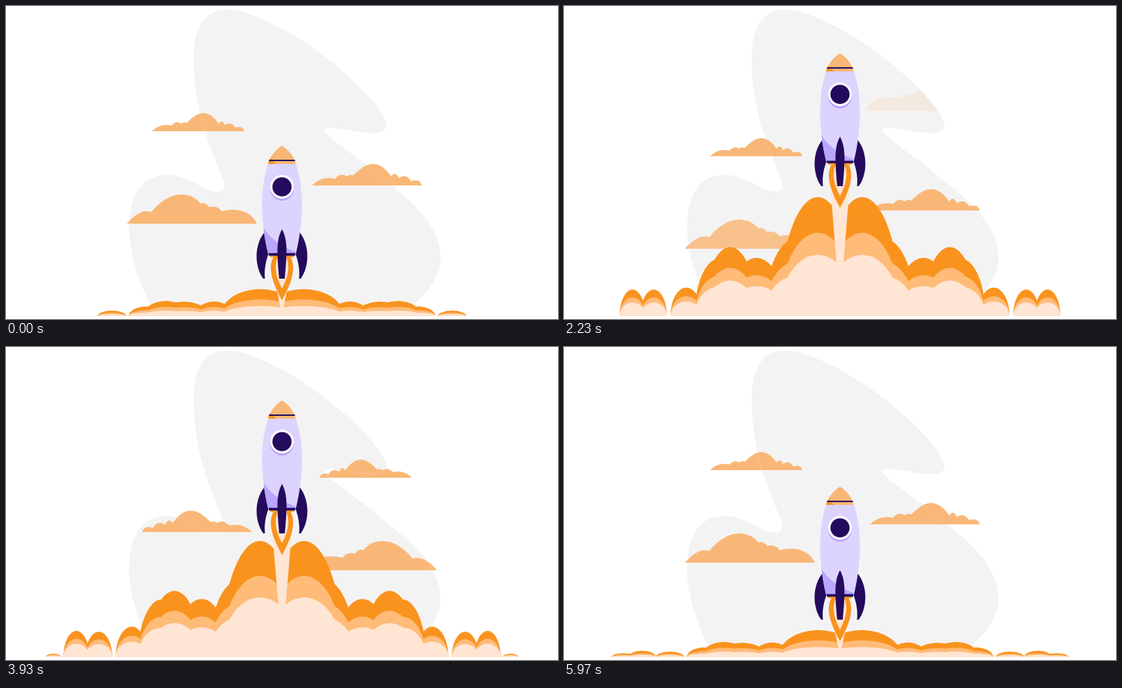
Write an HTML page that moves like this. It is 794 px wide and 450 px high and loops after 6010 ms.

```html
<!DOCTYPE html>
<html lang="en">
<head>
<meta charset="utf-8">
<title>Rocket launch</title>
<style>
html, body { margin: 0; width: 100%; height: 100%; overflow: hidden; background: #fff; }
svg { display: block; width: 794px; height: 450px; }
.navy { fill: #250b5d; }
.orange { fill: #f9931e; }
.mid { fill: #ffbb78; }
.light { fill: #ffe5d3; }
.cloud { fill: #f9b777; }
</style>
</head>
<body>
<svg viewBox="0 0 794 450">
  <defs>
    <path id="blob" d="M318 5C349 4 420 40 470 82C515 118 550 160 547 174C543 188 512 182 490 178C470 175 458 174 458 179C462 190 500 212 530 238C562 265 625 305 625 362C625 390 605 412 590 426L570 445H220L207 428C190 395 177 350 177 322C177 270 195 243 232 243C262 243 285 267 303 267C313 267 316 262 313 252C300 215 270 160 270 75C270 30 285 6 318 5Z"/>
    <clipPath id="inBlob"><use href="#blob"/></clipPath>
    <path id="big" d="M0 0C10 -12 22 -21 35 -17C48 -32 62 -42 78 -42C92 -42 100 -36 106 -29Q112 -32 118 -24Q130 -27 136 -18C155 -23 178 -20 187 0Z"/>
    <path id="small" d="M0 0Q12 -12 28 -8Q35 -16 42 -11Q46 -14 50 -12C60 -22 67 -26 74 -26C85 -26 92 -16 96 -11Q101 -18 105 -9Q114 -15 120 -5Q130 -9 133 0Z"/>
    <path id="fin" class="navy" d="M372 325C357 343 357 374 370 392H372.5C371 378 374 366 378 355L378 330Z"/>
  </defs>

  <g id="cloudsBack" class="cloud"></g>
  <use href="#blob" fill="#f3f3f3"/>
  <g clip-path="url(#inBlob)"><g id="cloudsFront" class="cloud"></g></g>
  <g id="smoke"></g>

  <g id="rocket">
    <path id="plume" class="light"/>
    <g id="flame">
      <path class="orange" d="M385 360C375 378 385 401 397 423C409 401 419 378 409 360Z"/>
      <path class="light" d="M391 360C385 375 388 389 397 406C406 389 409 375 403 360Z"/>
    </g>
    <use href="#fin"/>
    <use href="#fin" transform="matrix(-1 0 0 1 794 0)"/>
    <path fill="#ddd3ff" d="M377 227C365 262 366 310 377 356H417C428 310 429 262 417 227Z"/>
    <path fill="#b9a6fd" d="M370.5 319Q386 343 416 353L417 356H377Q372 336 370.5 319Z"/>
    <path class="cloud" d="M397 201C388 206 380 216 377 227H417C414 216 406 206 397 201Z"/>
    <path class="orange" d="M377 227Q378 222 380 219Q384 223 389 227Z"/>
    <path class="navy" d="M378.7 221H415.3L415.9 223H378.1Z"/>
    <circle cx="397" cy="263" r="17" fill="#b9a6fd"/>
    <circle cx="397" cy="260" r="17" fill="#fff"/>
    <circle cx="397" cy="260" r="13.8" class="navy"/>
    <path class="orange" d="M380 359H414V361H380Z"/>
    <path class="navy" d="M378 355.3H416V359H378Z"/>
    <path class="navy" d="M397 321C388 337 390 358 393 392H401C404 358 406 337 397 321Z"/>
  </g>
</svg>

<script>
const LOOP = 6010, WIDTH = 794, GROUND = 446, HALF = 2985;
const $ = id => document.getElementById(id);
const clamp = v => Math.min(1, Math.max(0, v));
const mix = (a, b, k) => a + (b - a) * k;

function add(parent, tag, attrs) {
  const el = document.createElementNS('http://www.w3.org/2000/svg', tag);
  for (const k in attrs) el.setAttribute(k, attrs[k]);
  return parent.appendChild(el);
}

function bezier(x1, y1, x2, y2) {
  const at = (a, b, s) => 3 * a * s * (1 - s) ** 2 + 3 * b * s * s * (1 - s) + s ** 3;
  return u => {
    u = clamp(u);
    let lo = 0, hi = 1;
    for (let i = 0; i < 24; i++) {
      const s = (lo + hi) / 2;
      if (at(x1, x2, s) < u) lo = s; else hi = s;
    }
    return at(y1, y2, lo);
  };
}
const rise = bezier(.3, .1, .07, 1);
const grow = bezier(.15, .1, .33, 1);

// Each kind of cloud passes four times, the third time mirrored
const FADE = 60, LIFE = 198;
const kinds = [
  { href: '#small', x: 210, scale: 1, y: 180, fadeAt: 66 },
  { href: '#big', x: 174, scale: 1, y: 313, fadeAt: 141 },
  { href: '#small', x: 440, scale: 1.19, y: 258, fadeAt: 108 }
];
const clouds = kinds.flatMap(kind => [0, 184, 382, 597].map((above, i) => ({
  fadeAt: kind.fadeAt,
  y0: kind.y - above,
  x: i === 2 ? WIDTH - kind.x : kind.x,
  size: `scale(${i === 2 ? -kind.scale : kind.scale} ${kind.scale})`,
  back: add($('cloudsBack'), 'use', { href: kind.href }),
  front: add($('cloudsFront'), 'use', { href: kind.href })
})));

function drawClouds(t) {
  const fallen = Math.max(0, t - 30) * .1;
  for (const c of clouds) {
    const y = c.y0 + fallen, age = y - c.fadeAt;
    const alpha = clamp(age / FADE) * clamp((LIFE + FADE - age) / FADE);
    const place = `translate(${c.x} ${y}) ${c.size}`;
    c.back.setAttribute('transform', place);
    c.front.setAttribute('transform', place);
    // Outside the backdrop a cloud is either solid or absent
    c.back.setAttribute('opacity', alpha >= .5 ? 1 : 0);
    c.front.setAttribute('opacity', alpha);
  }
}

// Smoke lobes of the left half: centre, half width, relative height
const wide = [[365, 56, 1], [333, 45, .65], [277, 42, .49], [239, 39, .58], [222, 34, .48],
  [176, 23, .24], [129, 19, .225], [98.5, 18.5, .225], [64, 10, 0]];
const tight = [[366, 58, 1], [340, 32, .7], [302, 26, .55], [258, 36, .53], [231, 33, .57],
  [204, 25, .37], [155, 21, .2], [114, 20, .236], [88, 18, .167]];

// time, how far the lobes are drawn in
const sway = [[0, .9], [570, .5], [1430, 1], [2230, 0], [3230, 0], [4630, .35], [5970, .9], [LOOP, .9]];

function track(points, t) {
  const i = points.findIndex(p => p[0] > t);
  const [t0, a] = points[i - 1], [t1, b] = points[i];
  return mix(a, b, (t - t0) / (t1 - t0));
}

const layers = ['orange', 'mid', 'light'].map(name => {
  const id = 'smoke-' + name;
  const path = add($('smoke'), 'path', { id, class: name });
  add($('smoke'), 'use', { href: '#' + id, transform: `matrix(-1 0 0 1 ${WIDTH} 0)` });
  return path;
});

function drawSmoke(t, g) {
  const height = 39 + 139 * g, thin = (1 - g) ** 2, pull = track(sway, t);
  const lobes = wide.map((lobe, i) => {
    const [x, w, h] = lobe.map((v, j) => mix(v, tight[i][j], pull));
    // The two outermost puffs rise after the start
    return [x, w, i > 6 ? h * clamp(t / 500) : h];
  });
  [1, .7 - .08 * thin, .515 - .14 * thin].forEach((ratio, i) => {
    layers[i].setAttribute('d', lobes.map(([x, w, h]) =>
      `M${x - w} ${GROUND}A${w} ${h * height * ratio} 0 0 1 ${x + w} ${GROUND}Z`).join(''));
  });
}

function drawRocket(t, g) {
  const lift = 134.5 * (t < HALF ? rise(t / 2700) : g);
  $('rocket').setAttribute('transform', `translate(0 ${-lift})`);

  const length = 245 + 130 * g * g;
  const half = 16.5 * (length - 180) / (length - 160);
  // The plume never reaches below the ground
  const end = Math.min(201 + length, GROUND + lift);
  const tip = half * (201 + length - end) / (length - 180);
  $('plume').setAttribute('d',
    `M${397 - half} 381H${397 + half}L${397 + tip} ${end}H${397 - tip}Z`);

  const flare = Math.sin(Math.PI * clamp(t / 2200));
  $('flame').setAttribute('transform',
    `translate(397 360) scale(${1 + .1 * flare} ${1 + .15 * flare}) translate(-397 -360)`);
}

const begin = performance.now();
function frame() {
  const t = (performance.now() - begin) % LOOP;
  const g = grow(Math.min(t, 2 * HALF - t) / HALF);
  drawClouds(t);
  drawSmoke(t, g);
  drawRocket(t, g);
  requestAnimationFrame(frame);
}
frame();
</script>
</body>
</html>
```
